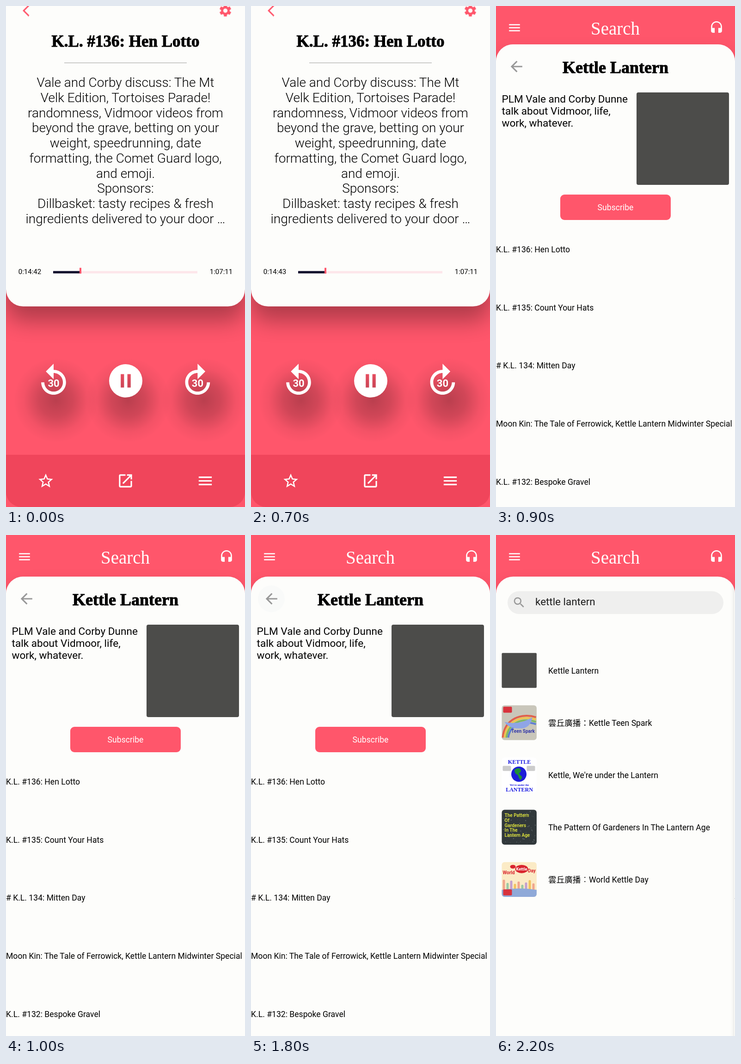
These frames come from a looping animation (517x1084 px, 2300 ms). An HTML page:

```html
<!DOCTYPE html>
<html lang="en">
<head>
<meta charset="utf-8">
<title>Podcast player</title>
<style>
  html, body { margin: 0; width: 100%; height: 100%; overflow: hidden; background: #ff566b; }
  svg { display: block; width: 100vw; height: 100vh; }
  text { font-family: Roboto, "Noto Sans CJK TC", "Noto Sans CJK SC", "Noto Sans CJK JP", "Noto Sans CJK", sans-serif; white-space: pre; }
  .serif { font-family: "Liberation Serif", "Noto Serif", serif; }
  .fat { font-weight: 700; stroke: #000; stroke-width: 1; }
  .light { font-weight: 300; }
  .bold { font-weight: 700; }
</style>
</head>
<body>
<svg id="stage" viewBox="0 0 517 1084" preserveAspectRatio="none"></svg>
<script>
const RED = '#ff566b', PAPER = '#fdfdfb';
const LOOP = 2300, STEP = 100, TRAVEL = 560, CORNER = 37;
const range = n => [...Array(n).keys()];

// Text whose capitals are centred on y
function text(str, x, y, size, { fill = '#000', anchor = 'start', cls = '', id = '' } = {}) {
  const safe = str.replace(/&/g, '&amp;');
  return `<text ${id && `id="${id}"`} class="${cls}" x="${x}" y="${y + size * 0.35}" font-size="${size}" fill="${fill}" text-anchor="${anchor}">${safe}</text>`;
}
const mid = (str, x, y, size, opts = {}) => text(str, x, y, size, { anchor: 'middle', ...opts });
const rect = (x, y, w, h, fill, rx = 0) =>
  `<rect x="${x}" y="${y}" width="${w}" height="${h}" rx="${rx}" fill="${fill}"/>`;
const circle = (x, y, r, fill, extra = '') => `<circle cx="${x}" cy="${y}" r="${r}" fill="${fill}" ${extra}/>`;
// A 24-unit icon centred on (x, y)
const icon = (d, x, y, scale, fill, flip = 1) =>
  `<path d="${d}" fill="${fill}" fill-rule="evenodd" transform="translate(${x} ${y}) scale(${scale * flip} ${scale}) translate(-12 -12)"/>`;

const ICON = {
  menu: 'M3 18h18v-2H3zM3 13h18v-2H3zM3 6v2h18V6z',
  headset: 'M12 1c-4.97 0-9 4.03-9 9v7c0 1.66 1.34 3 3 3h3v-8H5v-2c0-3.87 3.13-7 7-7s7 3.13 7 7v2h-4v8h3c1.66 0 3-1.34 3-3v-7c0-4.97-4.03-9-9-9z',
  replay: 'M12 5V1L7 6l5 5V7c3.31 0 6 2.69 6 6s-2.69 6-6 6-6-2.69-6-6H4c0 4.42 3.58 8 8 8s8-3.58 8-8-3.58-8-8-8z',
  pause: 'M12 2a10 10 0 1 0 0 20a10 10 0 1 0 0-20zm-1 14H9V8h2zm4 0h-2V8h2z',
  star: 'M22 9.24l-7.19-.62L12 2 9.19 8.63 2 9.24l5.46 4.73L5.82 21 12 17.27 18.18 21l-1.63-7.03zM12 15.4l-3.76 2.27 1-4.28-3.32-2.88 4.38-.38L12 6.1l1.71 4.04 4.38.38-3.32 2.88 1 4.28z',
  open: 'M19 19H5V5h7V3H5a2 2 0 0 0-2 2v14a2 2 0 0 0 2 2h14c1.1 0 2-.9 2-2v-7h-2zM14 3v2h3.59l-9.83 9.83 1.41 1.41L19 6.41V10h2V3z',
  chevron: 'M11.67 3.87L9.9 2.1 0 12l9.9 9.9 1.77-1.77L3.54 12z',
  back: 'M20 11H7.83l5.59-5.59L12 4l-8 8 8 8 1.41-1.41L7.83 13H20z',
  search: 'M15.5 14h-.79l-.28-.27A6.5 6.5 0 1 0 13.73 14.43l.27.28v.79l5 4.99L20.49 19zM9.5 14a4.5 4.5 0 1 1 0-9a4.5 4.5 0 0 1 0 9z',
};

function gear(x, y, scale) {
  const teeth = range(6).map(i =>
    `<rect x="-2.6" y="-9.9" width="5.2" height="5" rx=".6" transform="rotate(${i * 60})"/>`).join('');
  return `<g transform="translate(${x} ${y}) scale(${scale})" fill="${RED}">${teeth}
    <circle r="5.5" fill="none" stroke="${RED}" stroke-width="3.8"/></g>`;
}

function backdrop() {
  const shade = x => circle(x, 853, 92, 'url(#shade)');
  return rect(0, 0, 517, 1084, RED)
    + icon(ICON.menu, 40, 47, 1.31, '#fff')
    + mid('Search', 258, 48, 39, { fill: '#fff', cls: 'serif' })
    + icon(ICON.headset, 477, 47.4, 1.31, '#fff')
    + shade(108) + shade(264) + shade(428)
    + icon(ICON.replay, 103, 810.8, 3.35, '#fff')
    + icon(ICON.replay, 414.4, 810.8, 3.35, '#fff', -1)
    + mid('30', 103, 816.5, 22, { fill: '#fff', cls: 'bold' })
    + mid('30', 414.4, 816.5, 22, { fill: '#fff', cls: 'bold' })
    + icon(ICON.pause, 259, 811, 3.6, '#fff')
    + `<path d="M0 971H517V1051a33 33 0 0 1-33 33H33a33 33 0 0 1-33-33z" fill="#f0455b"/>`
    + icon(ICON.star, 86, 1027.5, 1.57, '#fff')
    + icon(ICON.open, 258.5, 1027.5, 1.57, '#fff')
    + icon(ICON.menu, 431, 1027.5, 1.57, '#fff');
}

function player() {
  const notes = ['Vale and Corby discuss: The Mt', 'Velk Edition, Tortoises Parade!',
    'randomness, Vidmoor videos from', 'beyond the grave, betting on your',
    'weight, speedrunning, date', 'formatting, the Comet Guard logo,', 'and emoji.',
    'Sponsors:', 'Dillbasket: tasty recipes & fresh', 'ingredients delivered to your door …'];
  return icon(ICON.chevron, 51, 10, 1.25, RED) + gear(474.5, 10, 1.28)
    + mid('K.L. #136: Hen Lotto', 258.5, 76, 35, { cls: 'serif fat' })
    + rect(126, 122.5, 265, 1, '#999')
    + notes.map((line, i) => mid(line, 258.5, 165.5 + i * 32.7, 28, { cls: 'light' })).join('')
    + mid('', 51.5, 575, 15, { id: 'elapsed' }) + mid('', 465.5, 575, 15, { id: 'left' })
    + rect(102, 573.5, 312, 5, '#fde6ea') + rect(102, 573.5, 58, 5, '#0b0a2a')
    + rect(159, 566.5, 4, 12.5, RED);
}

function showPage() {
  const episodes = ['K.L. #136: Hen Lotto', 'K.L. #135: Count Your Hats', '# K.L. 134: Mitten Day',
    'Moon Kin: The Tale of Ferrowick, Kettle Lantern Midwinter Special',
    'K.L. #132: Bespoke Gravel', 'K.L. #131: Otter Pond'];
  const about = ['PLM Vale and Corby Dunne', 'talk about Vidmoor, life,', 'work, whatever.'];
  return `<rect x="0" y="90" width="560" height="1120" fill="#000" opacity=".14" filter="url(#soft)"/>`
    + rect(0, 90, 517, 1120, PAPER)
    + circle(44, 138, 43, '#f7f9f8', 'id="ripple"')
    + icon(ICON.back, 44.3, 138, 1.57, '#999')
    + mid('Kettle Lantern', 258.5, 139, 36, { cls: 'serif fat' })
    + about.map((line, i) => text(line, 12.5, 207.7 + i * 26.4, 22.6)).join('')
    + rect(304, 194, 200, 200, '#4c4c4a', 4)
    + rect(139, 415, 239, 55, RED, 9)
    + mid('Subscribe', 258.5, 443, 17.6, { fill: '#fff' })
    + episodes.map((name, i) => text(name, 0, 534 + i * 125.65, 17.6)).join('');
}

// Cover pictures on a 75-unit square
const COVERS = [
  () => rect(0, 0, 75.4, 75.4, '#4c4c4a', 2),
  () => rect(0, 0, 75.4, 75.4, '#c9c6ba', 6)
    + ['#e0604c', '#eec34e', '#7fb964', '#5f7fd2'].map((c, i) =>
      `<path d="M${2 + i * 4} 70C${6 + i * 4} ${28 + i * 5} 44 ${16 + i * 5} 74 ${26 + i * 5}" fill="none" stroke="${c}" stroke-width="4"/>`).join('')
    + '<path d="M6 36Q36 44 66 26Q62 48 44 50Q16 52 6 36z" fill="#8fa5e6"/>'
    + rect(3, 3, 19, 13, '#d8323c', 2)
    + mid('Teen Spark', 46, 56, 10, { fill: '#3338a8', cls: 'bold' }),
  () => rect(0, 0, 75.4, 75.4, '#fff', 6)
    + mid('KETTLE', 38, 9, 12, { fill: '#1a1adf', cls: 'serif bold' })
    + rect(2, 18, 18, 11, '#ccc', 2) + rect(54, 18, 18, 11, '#ccc', 2)
    + circle(37, 36, 16.5, '#1d1dd8')
    + '<path d="M28 26q9-6 13 0q2 5-4 8l4 5q6 3-1 10q-4-6-5-11q-9-4-7-12z" fill="#1f8f36"/>'
    + mid("We're under the", 38, 59, 6, { fill: '#1a1adf', cls: 'serif bold' })
    + mid('LANTERN', 38, 69, 12, { fill: '#1a1adf', cls: 'serif bold' }),
  () => rect(0, 0, 75.4, 75.4, '#31383b', 6)
    + range(90).map(i => circle(2 + (i * 37.7) % 71, 2 + (i * i * 5.3) % 71, 0.5 + i % 3 * 0.3, '#7b858a', 'opacity=".6"')).join('')
    + ['The Pattern', 'Of', 'Gardeners', 'In The', 'Lantern Age'].map((line, i) =>
      text(line, 6, 12 + i * 10.8, 10, { fill: '#d5da3c', cls: 'bold' })).join(''),
  () => rect(0, 0, 75.4, 75.4, '#fbebc6', 6)
    + range(9).map(i => rect(2 + i * 8, 38 + (i * 7) % 12, 5, 24, ['#f0a58d', '#9cc9a4', '#c3a0cf', '#f2c25e'][i % 4], 2)).join('')
    + '<path d="M0 60Q38 54 75.4 60V69.4a6 6 0 0 1-6 6H6a6 6 0 0 1-6-6z" fill="#8fa9d8"/>'
    + '<ellipse cx="43" cy="15" rx="14" ry="9" fill="#d9242e"/><ellipse cx="24" cy="10" rx="6" ry="4" fill="#d9242e"/>'
    + mid('Kettle', 43, 15, 9, { fill: '#fff', cls: 'bold' })
    + mid('World', 15, 23, 10, { fill: '#d9242e', cls: 'bold' })
    + mid('Day', 65, 19, 10, { fill: '#d9242e', cls: 'bold' })
    + rect(3, 59, 19, 13, '#d8323c', 2),
];

function searchPage() {
  const results = ['Kettle Lantern', '雲丘廣播：Kettle Teen Spark', "Kettle, We're under the Lantern",
    'The Pattern Of Gardeners In The Lantern Age', '雲丘廣播︰World Kettle Day'];
  return rect(25, 121.5, 467, 49.5, '#efefee', 24.7)
    + icon(ICON.search, 50, 146, 1.257, '#999')
    + text('kettle lantern', 85, 144.5, 22.4, { fill: '#1c1c1c' })
    + results.map((name, i) => {
      const y = 293 + i * 113.1;
      return `<g transform="translate(12.5 ${y - 37.7})">${COVERS[i]()}</g>` + text(name, 113, y + 0.5, 17.6);
    }).join('');
}

document.getElementById('stage').innerHTML = `
  <defs>
    <radialGradient id="shade">
      <stop offset="0" stop-opacity=".27"/>
      <stop offset=".4" stop-opacity=".18"/>
      <stop offset=".75" stop-opacity=".045"/>
      <stop offset="1" stop-opacity="0"/>
    </radialGradient>
    <filter id="drop" x="-30%" y="-20%" width="160%" height="140%"><feGaussianBlur stdDeviation="24"/></filter>
    <filter id="soft" x="-10%" y="-10%" width="120%" height="120%"><feGaussianBlur stdDeviation="5"/></filter>
    <clipPath id="sheet"><rect y="90" width="517" height="1120" rx="${CORNER}"/></clipPath>
  </defs>
  ${backdrop()}
  <g id="panel">
    <rect y="122" width="517" height="1120" rx="${CORNER}" opacity=".3" filter="url(#drop)"/>
    ${rect(0, 90, 517, 1120, PAPER, CORNER)}
    <g clip-path="url(#sheet)">
      <g id="nav">${searchPage()}<g id="show">${showPage()}</g></g>
      <g id="player" transform="translate(0 ${TRAVEL})">${player()}</g>
    </g>
  </g>`;

const el = Object.fromEntries(['panel', 'nav', 'show', 'player', 'ripple', 'elapsed', 'left']
  .map(id => [id, document.getElementById(id)]));

// Panel drop and page cross-fade as shares of the whole, by time
const DROP = [[700, 0], [800, 0.395], [900, 0.9875], [1000, 1]];
const FADE = [[700, 0], [800, 0.38], [900, 1]];
function along(keys, t) {
  if (t <= keys[0][0]) return keys[0][1];
  for (let i = 1; i < keys.length; i++) {
    const [t0, a] = keys[i - 1], [t1, b] = keys[i];
    if (t <= t1) return a + (b - a) * (t - t0) / (t1 - t0);
  }
  return keys[keys.length - 1][1];
}

function bezier(x1, y1, x2, y2, x) {
  if (x <= 0 || x >= 1) return Math.min(1, Math.max(0, x));
  const at = (a, b, s) => 3 * (1 - s) ** 2 * s * a + 3 * (1 - s) * s * s * b + s ** 3;
  let lo = 0, hi = 1;
  for (let i = 0; i < 30; i++) {
    const s = (lo + hi) / 2;
    if (at(x1, x2, s) < x) lo = s; else hi = s;
  }
  return at(y1, y2, lo);
}

function draw(t) {
  const drop = along(DROP, t), fade = along(FADE, t);
  const slide = 517 * bezier(0.35, 0.91, 0.33, 0.97, (t - 1822) / 400);
  el.panel.setAttribute('transform', `translate(0 ${(drop - 1) * TRAVEL})`);
  el.nav.setAttribute('opacity', fade);
  el.player.setAttribute('opacity', 1 - fade);
  el.show.setAttribute('transform', `translate(${slide} 0)`);
  el.ripple.setAttribute('opacity', along([[1700, 0], [1800, 0.6], [1900, 1], [2100, 0]], t));
  el.ripple.setAttribute('r', along([[1700, 15], [1900, 43]], t));
  el.elapsed.textContent = t < 400 ? '0:14:42' : '0:14:43';
  el.left.textContent = t < 800 ? '1:07:11' : '1:07:10';
}

const start = performance.now();
function tick() {
  const t = Math.max(0, performance.now() - start) % LOOP;
  draw(Math.floor(t / STEP) * STEP);
  requestAnimationFrame(tick);
}
draw(0);
requestAnimationFrame(tick);
</script>
</body>
</html>
```
